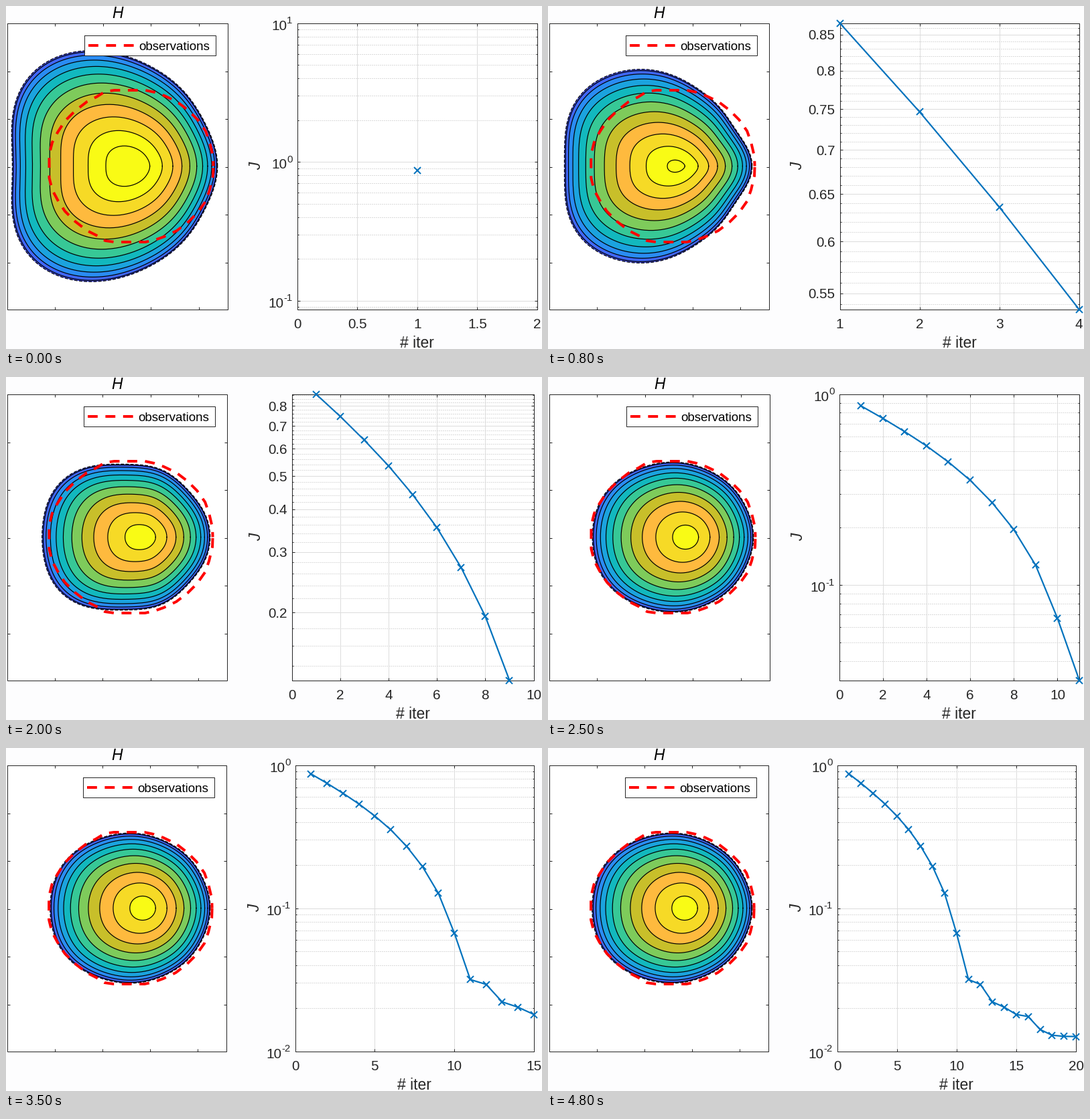
A matplotlib script for the animation above (5 s loop, 800x513 px).

```python
import math
from itertools import count

import matplotlib.pyplot as plt
import numpy as np
from matplotlib.animation import FuncAnimation

W, H, DPI = 800, 513, 64
PT = 72 / DPI                       # points per pixel
TOP, BOTTOM, LEFT, MID = 25.5, 453.5, 1.5, 239.5
INK, BLUE, RED, PAPER = "#262626", "#0072bd", "#ff0000", "#fdfdfe"
TICK, LABEL, SMALL = 20.8, 22.9, 18.8

COST = [0.8669, 0.7466, 0.636, 0.5354, 0.4412, 0.3537, 0.2706, 0.195,
        0.1269, 0.0669, 0.0317, 0.0293, 0.02213, 0.0203, 0.01806,
        0.01748, 0.01417, 0.01294, 0.0127, 0.01267]

# Ice outline at key iterations: radii every 18 degrees, right to left
KEYS = [1, 4, 6, 9, 11]
RADII = [
    [128, 126, 128, 135.5, 146, 162, 181.5, 199, 203, 188, 179],
    [111, 105, 102.5, 107, 117, 132.5, 152, 170, 181, 177, 170.5],
    [106, 103.5, 100, 100, 103, 114, 133.5, 155, 167.5, 168, 164],
    [100, 98, 97, 98.5, 103, 108.5, 114, 132, 147, 153, 152],
    [98, 97, 98.5, 101, 104, 110.5, 117, 126.5, 136.5, 142, 143],
]
CENTER = [188, 195, 200, 206, 209]
PEAK = [12, 11.33, 10.99, 10.73, 10.62]         # summit in contour steps
SQUEEZE = [0.22, 0.35, 0.3, 0.08, 0]            # flattening of inner rings

BANDS = ["#4650e0", "#4067fa", "#2a8cf3", "#1ba3de", "#12b8be", "#37c896",
         "#7ecb5b", "#c8bf2a", "#feba3e", "#f6da26", "#f9fb15", "#f9fb15"]

# Upper half of the observed margin, right to left
OBS = np.array([
    (309.5, 239.5), (309, 225), (304, 204), (298, 187), (286, 170),
    (272, 156), (255, 143), (236, 134), (222, 129), (208, 126), (162, 126),
    (148, 128), (135, 136), (121, 143), (103, 157), (88, 172), (77, 189),
    (69, 204), (64.5, 222), (64.5, 239.5)])

ORDER = np.arange(8)
ANGLE = np.linspace(0, 2 * math.pi, 241)
WAVES = np.cos(np.outer(ANGLE, ORDER))
KNOTS = np.cos(np.outer(np.radians(np.arange(0, 181, 18)), ORDER))
COEFS = np.linalg.lstsq(KNOTS, np.array(RADII, float).T, rcond=None)[0].T

plt.rcParams["font.family"] = "Liberation Sans"
fig = plt.figure(figsize=(W / DPI, H / DPI), dpi=DPI, facecolor=PAPER)
ax = fig.add_axes([0, 0, 1, 1])
layer = count(1)


def line(x, y, color=INK, width=1.0, **kw):
    ax.plot(x, y, color=color, lw=width * PT, zorder=next(layer), **kw)


def rules(draw, at, lo, hi, color=INK, style="-"):
    draw(at, lo, hi, colors=color, lw=PT, linestyles=style,
         zorder=next(layer))


def text(x, y, s, size=TICK, ha="center", color=INK, **kw):
    ax.text(x, y, s, size=size * PT, ha=ha, va="baseline", color=color,
            zorder=next(layer), **kw)


def frame(x0, x1, y0, y1):
    line([x0, x1, x1, x0, x0], [y0, y0, y1, y1, y0],
         solid_joinstyle="miter")


def ticks(xs, ys, x0, x1, size):
    """Inward ticks on all four sides."""
    if len(xs):
        rules(ax.vlines, xs, TOP, TOP + size)
        rules(ax.vlines, xs, BOTTOM - size, BOTTOM)
    if len(ys):
        rules(ax.hlines, ys, x0, x0 + size)
        rules(ax.hlines, ys, x1 - size, x1)


def layout(n):
    """Right edge of the map, then left, right and label x of the plot."""
    if n == 1:
        return 330.5, 434.5, 793, 372
    if n <= 6:
        return 329.5, 435.5, 792.5, 371.5
    if n <= 8:
        return 330.5, 429.5, 793, 374
    if n == 9:
        return 329.5, 426.5, 787.5, 372.5
    if n in (11, 16):
        return 330.5, 434.5, 793, 372
    return 328.5, 431.5, 788, 370


def x_range(n):
    if n == 1:
        return 0, 2, 0.5
    if n <= 8:
        return 1, n, {2: 0.2, 3: 0.5}.get(n, 1)
    if n <= 12:
        return 0, max(n, 10), 2
    return 0, 16 if n == 16 else 5 * math.ceil(n / 5), 5


def y_range(n):
    last = COST[n - 1]
    if n == 1:
        return last / 10, 10
    if n < 10:
        return last, COST[0]
    return (last if n < 12 else 0.01), 1


def multiples(step, lo, hi):
    first, end = math.ceil(lo / step - 1e-6), math.floor(hi / step + 1e-6)
    return [round(i * step, 6) for i in range(first, end + 1)]


def y_ticks(n, lo, hi):
    if 1 < n < 10:
        step, minor = ((0.02, 0.005) if n == 2 else
                       (0.05, 0.01) if n < 7 else (0.1, 0.02))
        return multiples(step, lo, hi), multiples(minor, lo, hi)
    inside = lambda v: lo * 0.999 <= v <= hi * 1.001
    major = [10.0 ** e for e in range(-2, 2) if inside(10.0 ** e)]
    minor = [m * 10.0 ** e for e in range(-2, 1) for m in range(2, 10)]
    return major, [v for v in minor if inside(v)]


def draw_map(n, right):
    blend = lambda vals: np.interp(n, KEYS, vals)
    coef = np.array([blend(c) for c in COEFS.T])
    cx, peak, squeeze = blend(CENTER), blend(PEAK), blend(SQUEEZE)
    scale = (right - LEFT) / 329
    fit = lambda x: LEFT + (x - LEFT) * scale

    ax.fill([LEFT, right, right, LEFT], [TOP, TOP, BOTTOM, BOTTOM],
            color="white", lw=0, zorder=next(layer))
    for k, band in enumerate(BANDS[:math.ceil(peak)]):
        s = (1 - (k / peak) ** 1.78) ** 0.8
        r = s * WAVES @ (coef * s ** (0.15 * np.maximum(ORDER - 2, 0)))
        x = fit(cx + r * np.cos(ANGLE))
        y = MID - r * np.sin(ANGLE) * (1 - squeeze * (1 - s))
        ax.fill(x, y, color=band, lw=0, zorder=next(layer))
        line(x, y, "black", 1.2, ls="-" if k else (0, (4, 2)))

    lower = OBS[::-1] * [1, -1] + [0, 2 * MID]
    loop = np.vstack([OBS, lower[1:]])
    dash = (3.7, 2.9)
    line(fit(loop[:, 0]), loop[:, 1], RED, 4, ls=(1.8, dash),
         dash_capstyle="butt")

    frame(LEFT, right, TOP, BOTTOM)
    ticks([fit(LEFT + 71.6 * i) for i in range(1, 5)],
          [97.5 + 71.6 * i for i in range(5)], LEFT, right, 4)
    text((LEFT + right) / 2 + 0.5, 18, "H", LABEL, color="black",
         style="italic")

    x0, x1 = right - 214, right - 18
    ax.fill([x0, x1, x1, x0], [43.5, 43.5, 73.5, 73.5], color="white",
            lw=0, zorder=next(layer))
    frame(x0, x1, 43.5, 73.5)
    line([x0 + 6, x0 + 74], [58.5, 58.5], RED, 4, ls=(0, dash),
         dash_capstyle="butt")
    text(x0 + 81.5, 66, "observations", SMALL, "left", "black")


def draw_cost(n, x0, x1, label_x):
    xlo, xhi, step = x_range(n)
    lo, hi = y_range(n)
    px = lambda v: x0 + (x1 - x0) * (np.asarray(v) - xlo) / (xhi - xlo)
    py = lambda v: (BOTTOM - (BOTTOM - TOP) * np.log(np.asarray(v) / lo)
                    / math.log(hi / lo))
    xs = multiples(step, xlo, xhi)
    major, minor = y_ticks(n, lo, hi)

    ax.fill([x0, x1, x1, x0], [TOP, TOP, BOTTOM, BOTTOM], color="white",
            lw=0, zorder=next(layer))
    rules(ax.hlines, py(minor), x0, x1, "#b8b8b8", (0, (1, 2)))
    rules(ax.hlines, py(major), x0, x1, "#dcdcdc")
    rules(ax.vlines, px(xs), TOP, BOTTOM, "#dcdcdc")
    frame(x0, x1, TOP, BOTTOM)
    ticks(px(xs), py(major), x0, x1, 4)
    ticks([], py(minor), x0, x1, 2)

    for v in xs:
        text(px(v), 481.5, f"{v:g}")
    for v in major:
        y = py(v)
        if 1 < n < 10:
            text(x0 - 7, y + 7.5, f"{v:g}", ha="right")
            continue
        power = str(round(math.log10(v)))
        text(x0 - 7, y + 0.5, power, 15, "right")
        wide = 15 * (0.556 + 0.333 * (len(power) - 1))
        text(x0 - 7 - wide, y + 10, "10", ha="right")
    text((x0 + x1) / 2, 511, "# iter", LABEL)
    text(label_x + 8, MID, "J", LABEL, style="italic", rotation=90,
         rotation_mode="anchor")

    line(px(range(1, n + 1)), py(COST[:n]), BLUE, 2.2, marker="x",
         ms=9.5 * PT, mew=2 * PT, solid_joinstyle="round")


def draw(i):
    global layer
    layer = count(1)
    t = i * 100
    n = 2 * (t // 500) + 1 + (t % 500 >= 300)
    ax.clear()
    ax.set_axis_off()
    ax.set_xlim(0, W)
    ax.set_ylim(H, 0)
    right, x0, x1, label_x = layout(n)
    draw_map(n, right)
    draw_cost(n, x0, x1, label_x)
    return []


anim = FuncAnimation(fig, draw, frames=50, interval=100, repeat=True,
                     repeat_delay=0)
plt.show()
```
